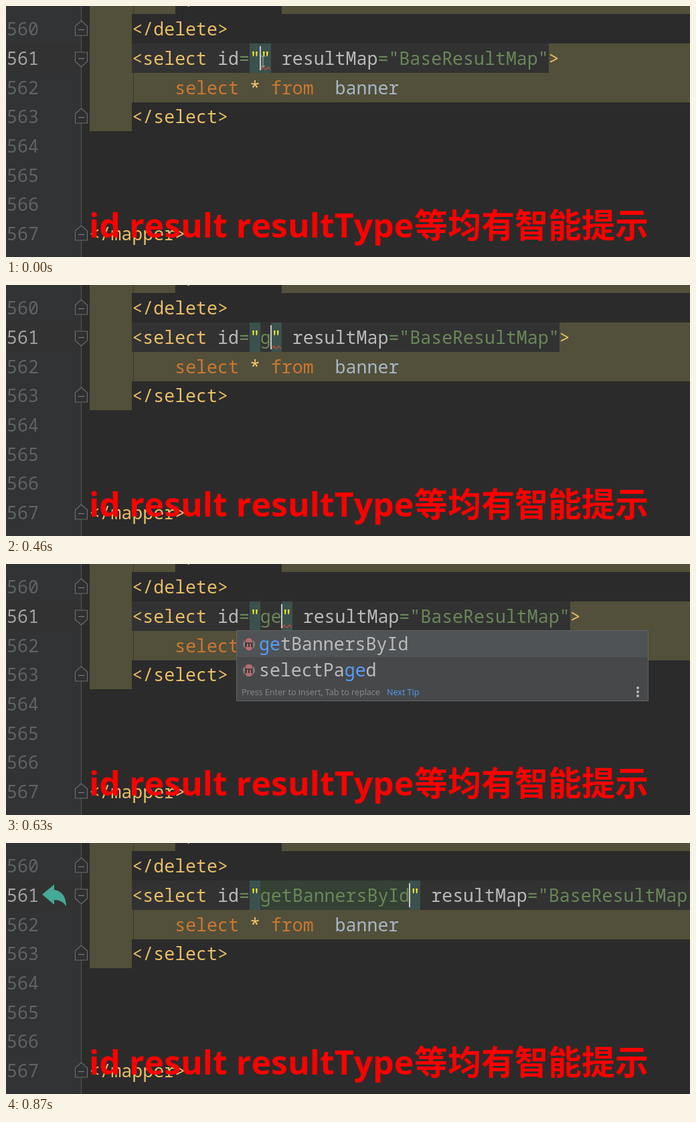
Write an HTML page with a canvas that moves like this. It is 1022x375 px and loops after 1150 ms.

```html
<!DOCTYPE html>
<html lang="zh">
<head>
<meta charset="utf-8">
<style>
html, body { margin: 0; width: 100%; height: 100%; overflow: hidden; background: #2b2b2b; }
canvas { display: block; }
</style>
</head>
<body>
<canvas id="stage" width="1022" height="375"></canvas>
<script>
const ctx = document.getElementById('stage').getContext('2d');
const LOOP = 1150, CHAR = 15.96, LEFT = 124.5, ROW = 43.75, ITEM = 38.8;
const CODE = '26.6px "Noto Sans Mono", monospace';
const HINT = '12.6px "Open Sans", sans-serif';
const OLIVE = '#52503a', TAG = '#e8bf6a', ATTR = '#bababa', STR = '#6a8759',
      KEY = '#cc7832', BRACE = '#ffef28', LINK = '#589df6';

const METHODS = ['insert', 'insertSelective', 'insertSelectiveIgnore', 'batchInsert',
                 'getBannersById', 'deleteByPrimaryKey', 'selectByPrimaryKey'];
const PICKED = 'getBannersById';
const G_ITEMS = [PICKED, 'insertSelectiveIgnore', 'selectPaged'];
const GE_ITEMS = [PICKED, 'selectPaged'];

const STEPS = [
  { at: 0, value: '', mouse: true },
  { at: 150, value: 'i' },
  { at: 230, value: 'i', items: METHODS },
  { at: 460, value: 'g' },
  { at: 550, value: 'g', items: G_ITEMS, hint: true },
  { at: 630, value: 'ge', items: GE_ITEMS, hint: true },
  { at: 710, value: 'g', items: G_ITEMS, hint: true, blink: true },
  { at: 790, value: PICKED },
  { at: 870, value: PICKED, linked: true }
];

const col = n => LEFT + n * CHAR;
const rowTop = row => Math.round(12.3 + row * ROW);
const baseline = row => 44.2 + row * 43.7;

function rect(color, x, y, w, h) {
  ctx.fillStyle = color;
  ctx.fillRect(Math.round(x), y, Math.round(w), h);
}

function band(color, row, from, to) {
  const x = Math.round(from), y = rowTop(row);
  rect(color, x, y, Math.round(to) - x, rowTop(row + 1) - y);
}

function text(str, x, y, color, font = CODE) {
  ctx.font = font;
  ctx.fillStyle = color;
  ctx.fillText(str, x, y);
}

// Draws consecutive [text, color] pieces on the character grid.
function run(x, y, ...parts) {
  for (const [str, color] of parts) {
    text(str, x, y, color);
    x += str.length * CHAR;
  }
}

function path(points, color, width, fill) {
  ctx.beginPath();
  points.forEach(p => ctx.lineTo(...p));
  if (fill) {
    ctx.closePath();
    ctx.fillStyle = fill;
    ctx.fill();
  }
  ctx.strokeStyle = color;
  ctx.lineWidth = width;
  ctx.stroke();
}

function fold(y, dir) {
  const p = [[103.5, 9], [103.5, -5], [112.5, -13], [121.5, -5], [121.5, 9]];
  path(p.map(([x, dy]) => [x, y + dy * dir]), '#6b6d6f', 1.2, '#2f3031');
  path([[108, y + .5], [117, y + .5]], '#777a7c', 1.2);
}

function gutter(linked) {
  rect('#313335', 0, 0, 112, 375);
  band('#323232', 1, 0, 112);
  rect('#555555', 112, 0, 1, 375);
  for (let i = 0; i < 8; i++)
    text(String(560 + i), 1, baseline(i), i === 1 ? '#a4a3a3' : '#606366');
  if (linked) {
    ctx.fillStyle = '#46a896';
    ctx.fill(new Path2D('M54 77L72 62V70C83 71 90 80 90 95C86 88 80 85 72 85V92Z'));
  }
}

function folds() {
  fold(35, 1);
  fold(78, -1);
  fold(166, 1);
  fold(341, 1);
}

function editor({ value, mouse, blink }) {
  const opening = 15, closing = opening + 1 + value.length, end = closing + 27 - 3;
  const done = value === PICKED;

  rect(OLIVE, LEFT, 0, 8 * CHAR, 12);
  rect(OLIVE, 412, 0, 610, 12);
  for (const row of [0, 1, 3]) band(OLIVE, row, LEFT, col(4));
  band('#323232', 1, col(4), 1022);
  if (!done) band(OLIVE, 1, col(end + 3), 1022);
  band(OLIVE, 2, LEFT, 1022);
  rect('#383831', 190, 0, 1, 12);
  rect('#383831', 190, rowTop(2), 1, 44);

  band('#3b514d', 1, col(opening), col(opening + 1));
  if (done) band('#344134', 1, col(opening + 1), col(closing));
  band('#3b514d', 1, col(closing), col(closing + 1));

  run(col(8), .5, ['</', TAG]);
  run(col(4), baseline(0), ['</delete>', TAG]);
  run(col(4), baseline(1), ['<select ', TAG], ['id', ATTR], ['=', STR], ['"', BRACE],
      [value, STR], ['"', BRACE], [' resultMap', ATTR], ['="BaseResultMap"', STR], ['>', TAG]);
  run(col(8), baseline(2), ['select ', KEY], ['* ', '#ffc66d'], ['from  ', KEY],
      ['banner', '#a9b7c6']);
  run(col(4), baseline(3), ['</select>', TAG]);
  run(LEFT, baseline(7), ['</mapper>', TAG]);

  const x = col(closing);
  if (!done) {
    const wave = [0, 4, 8, 12, 15].map((dx, i) => [x + dx, i % 2 ? 91 : 95.5]);
    path(wave, '#bc4f3c', 1.3);
  }
  if (!blink) rect('#c8c8c8', x - 1, 60, 2, 36);
  if (mouse) {
    path([[384, 75], [384, 90]], '#b5b5b5', 1);
    path([[381, 75], [387, 75]], '#b5b5b5', 1);
    path([[381, 90], [387, 90]], '#b5b5b5', 1);
  }
}

function disc(x, y, r, color) {
  ctx.beginPath();
  ctx.arc(x, y, r, 0, 7);
  ctx.fillStyle = color;
  ctx.fill();
}

function methodIcon(y) {
  disc(363, y, 9, '#7c8083');
  rect('#46484a', 357, y - 9, 12, 18);
  ctx.beginPath();
  ctx.roundRect(358, y - 9, 10, 18, 4);
  ctx.fillStyle = '#b66b70';
  ctx.fill();
  ctx.textAlign = 'center';
  text('m', 363, y + 4, '#3a2c2e', 'bold 12px "Open Sans", sans-serif');
  ctx.textAlign = 'left';
}

function popup({ value, items, hint }) {
  const height = hint ? items.length * ITEM + 28.6 : 300;
  const bottom = Math.round(99 + height);
  rect('#616365', 344, 99, 616, bottom - 99);
  rect('#46484a', 345, 100, 614, bottom - 101);
  rect('#4f5355', 345, 100, 614, 39);
  items.forEach((name, i) => {
    const y = 129 + i * ITEM;
    const from = name.toLowerCase().indexOf(value), to = from + value.length;
    methodIcon(Math.round(y - 9));
    run(378, y, [name.slice(0, from), '#bbbbbb'], [name.slice(from, to), LINK],
        [name.slice(to), '#bbbbbb']);
  });
  if (hint) {
    text('Press Enter to insert, Tab to replace', 352, bottom - 9, '#8c8c8c', HINT);
    text('Next Tip', 569, bottom - 9, LINK, HINT);
    for (const dy of [-20, -14, -8]) disc(944, bottom + dy, 1.9, '#bfc1c2');
  }
}

function caption() {
  ctx.fontKerning = 'none';
  text('id result resultType', 124, 346, '#ff0000', 'bold 50px "Open Sans", sans-serif');
  ctx.fontKerning = 'auto';
  text('等均有智能提示', 610, 346, '#ff0000',
       'bold 50px "Noto Sans CJK SC", "Noto Sans CJK", sans-serif');
}

function draw(now) {
  const t = now % LOOP;
  const step = STEPS.findLast(s => s.at <= t);
  rect('#2b2b2b', 0, 0, 1022, 375);
  gutter(step.linked);
  editor(step);
  folds();
  if (step.items) popup(step);
  caption();
}

const startTime = performance.now();
(function tick() {
  draw(performance.now() - startTime);
  requestAnimationFrame(tick);
})();
</script>
</body>
</html>
```
